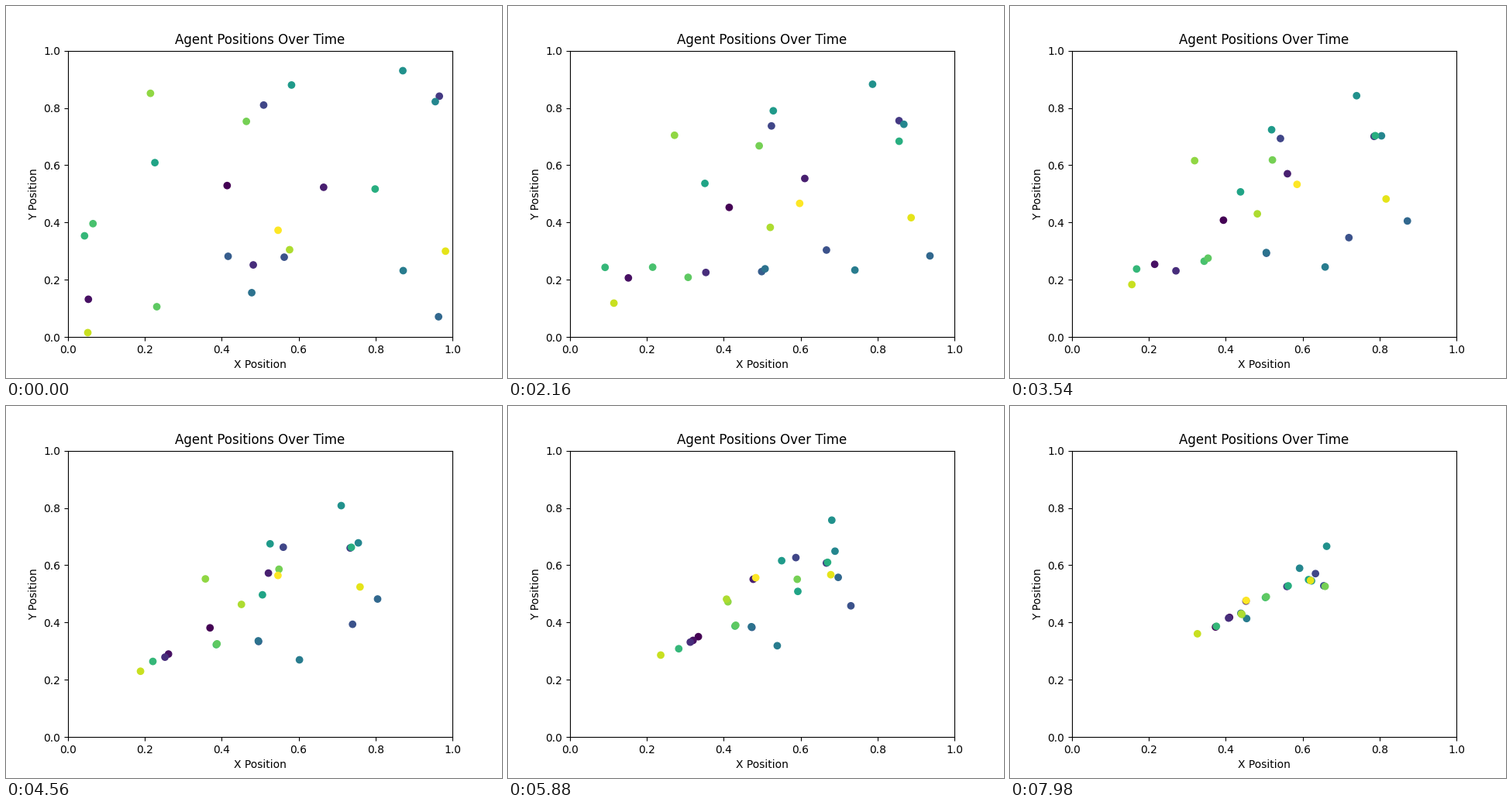
These frames come from a looping animation (640x480 px, 8 s). A matplotlib script:

```python
import numpy as np
import matplotlib.pyplot as plt
from matplotlib.animation import FuncAnimation

STEPS = 134      # simulation states in one loop
HOLD = 3         # 20 ms ticks per state
TICKS = 400

# start x, start y, index of the agent being chased, speed (1e-5 per step)
AGENTS = np.array([
    (.414, .529, 3, 214), (.053, .132, 11, 344), (.665, .523, 20, 231),
    (.482, .252, 1, 365), (.966, .841, 1, 387), (.509, .810, 6, 207),
    (.5625, .279, 23, 301), (.4165, .282, 9, 310), (.964, .071, 23, 600),
    (.478, .155, 21, 248), (.872, .232, 7, 364), (.9555, .822, 2, 327),
    (.871, .930, 19, 268), (.5815, .880, 19, 292), (.226, .609, 8, 402),
    (.799, .517, 4, 493), (.043, .3535, 1, 347), (.065, .396, 18, 604),
    (.231, .106, 12, 355), (.464, .753, 6, 250), (.2145, .851, 7, 437),
    (.5765, .305, 20, 266), (.0515, .0155, 13, 335), (.982, .300, 13, 418),
    (.5465, .373, 2, 300),
])
SLOW_STARTER = 2


def simulate():
    """Every agent heads for its target at its own constant speed."""
    pos = AGENTS[:, :2].copy()
    target = AGENTS[:, 2].astype(int)
    path = [pos]
    for k in range(1, STEPS):
        speed = AGENTS[:, 3] * 1e-5
        speed[SLOW_STARTER] *= min(1, k / 19)
        gap = pos[target] - pos
        dist = np.hypot(gap[:, 0], gap[:, 1])
        share = np.minimum(1, speed / np.maximum(dist, 1e-9))
        pos = pos + gap * share[:, None]
        path.append(pos)
    return path


path = simulate()

fig, ax = plt.subplots(figsize=(6.4, 4.8), dpi=100)
dots = ax.scatter(*path[0].T, c=np.arange(len(AGENTS)), cmap="viridis")
ax.set_xlim(0, 1)
ax.set_ylim(0, 1)
ax.set_title("Agent Positions Over Time")
ax.set_xlabel("X Position")
ax.set_ylabel("Y Position")


def update(tick):
    dots.set_offsets(path[min(tick // HOLD, STEPS - 1)])
    return (dots,)


anim = FuncAnimation(fig, update, frames=TICKS, interval=20,
                     repeat=True, repeat_delay=0)
plt.show()
```
